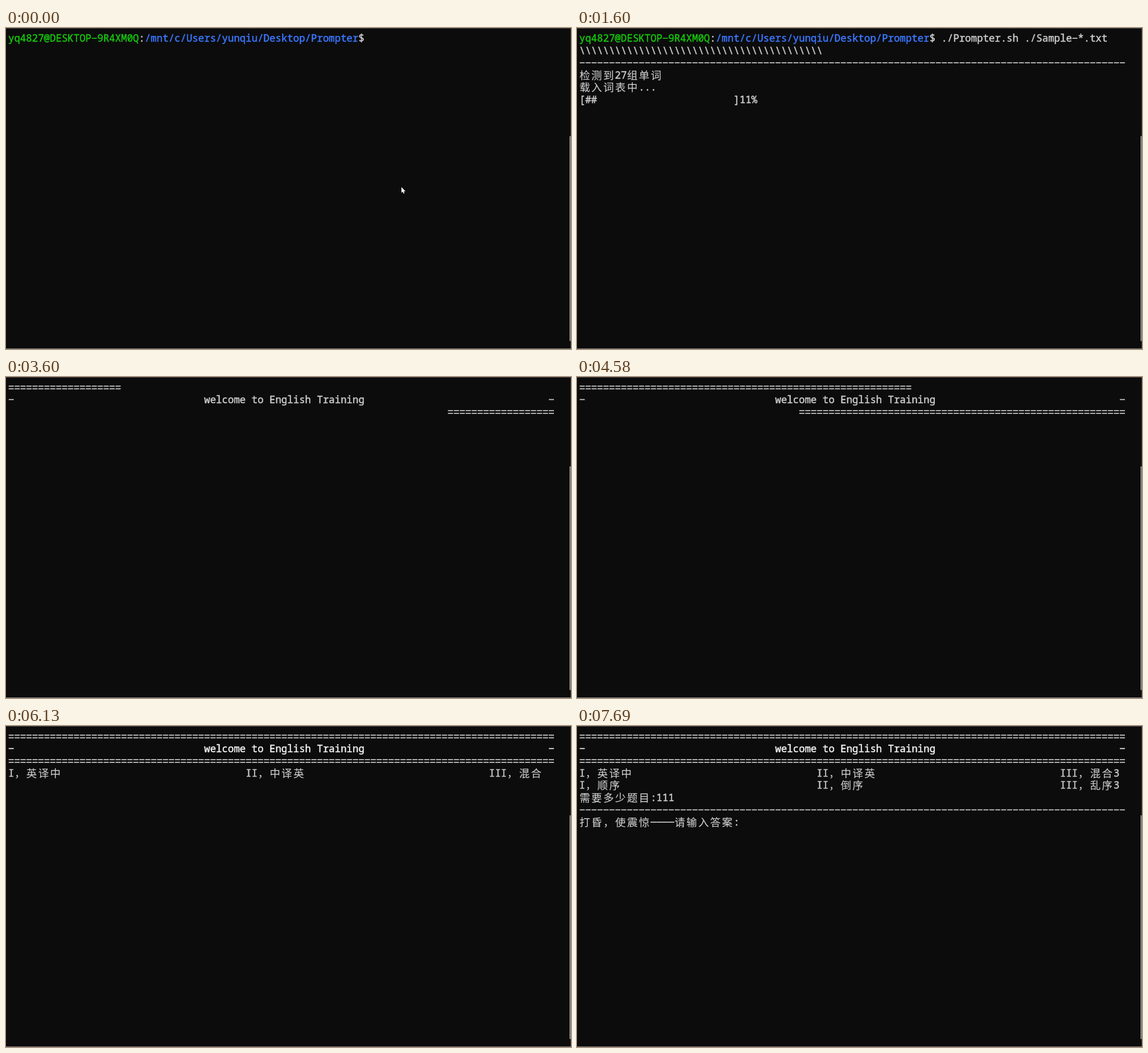
Recreate the animation shown at these times as an HTML page with a canvas. Size 993x564 px, loop 8000 ms.

```html
<!DOCTYPE html>
<html lang="zh">
<head>
<meta charset="utf-8">
<title>Terminal</title>
<style>
  html, body { margin: 0; width: 100%; height: 100%; overflow: hidden; background: #0c0c0c; }
  canvas { display: block; width: 993px; height: 564px; }
</style>
</head>
<body>
<canvas id="stage" width="993" height="564"></canvas>
<script>
const ctx = document.getElementById('stage').getContext('2d');
const LOOP = 8000, COLS = 92;
const LEFT = 4, CELL = 10.432, BASE = 24.2, PITCH = 21.55;
const GREY = '#cccccc', WHITE = '#f2f2f2', GREEN = '#16c60c', BLUE = '#3b78ff';
const LATIN = {
  font: '400 17.4px "Noto Sans Mono", "DejaVu Sans Mono", monospace',
  weight: 0.5, dx: 0, dy: 0
};
const HAN = {
  font: '400 18.5px "Noto Sans CJK SC", "Noto Sans CJK", "Noto Sans CJK JP", sans-serif',
  weight: 0.1, dx: 0.5, dy: 0.8
};

const USER = 'yq4827@DESKTOP-9R4XM0Q';
const PATH = '/mnt/c/Users/yunqiu/Desktop/Prompter';
const COMMAND = './Prompter.sh ./Sample-*.txt';

// [time, value] pairs; values hold until the next time
const LOADED = [[1480, 1], [1600, 3], [1720, 6], [1840, 9], [1960, 12],
  [2110, 16], [2230, 19], [2350, 22], [2470, 25], [2620, 27]];
const RULE = [[3180, 1], [3330, 7], [3450, 13], [3600, 19], [3750, 24], [3900, 30],
  [4020, 35], [4170, 37], [4340, 45], [4460, 50], [4580, 56], [4720, 61], [4840, 66],
  [4970, 70], [5090, 75], [5210, 80], [5360, 85], [5480, 90], [5600, 92]];
const TYPED = [[0, ''], [7270, '1'], [7390, '11'], [7540, '111']];

function valueAt(steps, t) {
  let value = steps[0][1];
  for (const [time, next] of steps) if (t >= time) value = next;
  return value;
}

const isWide = ch => /[\u3000-\u9fff\uff00-\uffef]/.test(ch);

function bar(x, y, inset) {
  ctx.fillRect(x + inset, y, CELL - 2 * inset, 1.7);
}

// A thin outline in the text colour gives the terminal's sturdier strokes
function glyph(ch, x, y, face) {
  ctx.font = face.font;
  ctx.lineWidth = face.weight;
  ctx.fillText(ch, x + face.dx, y + face.dy);
  ctx.strokeText(ch, x + face.dx, y + face.dy);
}

// Writes text on the character grid and returns the next free column
function write(text, row, col = 0, color = GREY) {
  const y = BASE + row * PITCH;
  ctx.fillStyle = ctx.strokeStyle = color;
  for (const ch of text) {
    const x = LEFT + col * CELL;
    const wide = isWide(ch);
    if (ch === '-') bar(x, y - 7, 0.8);
    else if (ch === '—') bar(x, y - 7, 0);
    else if (ch === '=') {
      bar(x, y - 9, 0.7);
      bar(x, y - 4.3, 0.7);
    } else if (ch !== ' ') {
      glyph(ch, x, y, wide ? HAN : LATIN);
    }
    col += wide ? 2 : 1;
  }
  return col;
}

function drawWindow(thumbTop) {
  ctx.fillStyle = '#0c0c0c';
  ctx.fillRect(0, 0, 993, 564);
  ctx.fillStyle = '#4c4c4c';
  ctx.fillRect(0, 0, 993, 1);
  ctx.fillStyle = '#3a3a3a';
  ctx.fillRect(992, 0, 1, 564);
  ctx.fillStyle = '#8a8a8a';
  ctx.fillRect(0, 563, 993, 1);
  ctx.fillStyle = '#9c9c9c';
  ctx.fillRect(990.5, thumbTop, 2, 550 - thumbTop);
}

function drawPointer() {
  ctx.fillStyle = '#ffffff';
  ctx.fill(new Path2D('M695 279.5V289.6L697.3 287.6L698.8 291L700.4 290.3L699 287H702Z'));
}

function drawShell(t) {
  let col = write(USER, 0, 0, GREEN);
  col = write(':', 0, col);
  col = write(PATH, 0, col, BLUE);
  col = write('$ ', 0, col);
  if (t >= 920) write(COMMAND, 0, col);
  else if (t >= 390) write('clear', 0, col);

  if (t < 1480) return drawPointer();

  const loaded = valueAt(LOADED, t);
  const percent = Math.floor(loaded / 27 * 100);
  const hashes = '#'.repeat(Math.floor(percent / 4)).padEnd(25);
  write('\\'.repeat(41), 1);
  write('-'.repeat(COLS), 2);
  write('检测到27组单词', 3);
  write('载入词表中...', 4);
  write(`[${hashes}]${percent}%`, 5);
  if (t >= 2620) {
    write('已加载1张词表', 6);
    write('-'.repeat(COLS), 7);
    write('输入Y或者y验证词表', 8);
  }
}

function drawMenu(row, items, chosen) {
  write('I，' + items[0], row);
  write('II，' + items[1], row, 40);
  write('III，' + items[2] + (chosen ? '3' : ''), row, 81);
}

function drawTraining(t) {
  const count = valueAt(RULE, t);
  const lower = count === COLS ? COLS : count - 1;
  const titleColor = t >= 6130 ? WHITE : GREY;
  write('='.repeat(count), 0);
  write('-', 1, 0, titleColor);
  write('welcome to English Training', 1, 33, titleColor);
  write('-', 1, COLS - 1, titleColor);
  write('='.repeat(lower), 2, COLS - lower);

  if (t >= 6130) drawMenu(3, ['英译中', '中译英', '混合'], t >= 6410);
  if (t >= 6410) drawMenu(4, ['顺序', '倒序', '乱序'], t >= 6870);
  if (t >= 6870) write('需要多少题目:' + valueAt(TYPED, t), 5);
  if (t >= 7690) {
    write('-'.repeat(COLS), 6);
    write('打昏，使震惊————请输入答案:', 7);
  }
}

function render() {
  const t = performance.now() % LOOP;
  const training = t >= 3180;
  drawWindow(training ? 157 : 190);
  if (training) drawTraining(t);
  else drawShell(t);
  requestAnimationFrame(render);
}

render();
</script>
</body>
</html>
```
